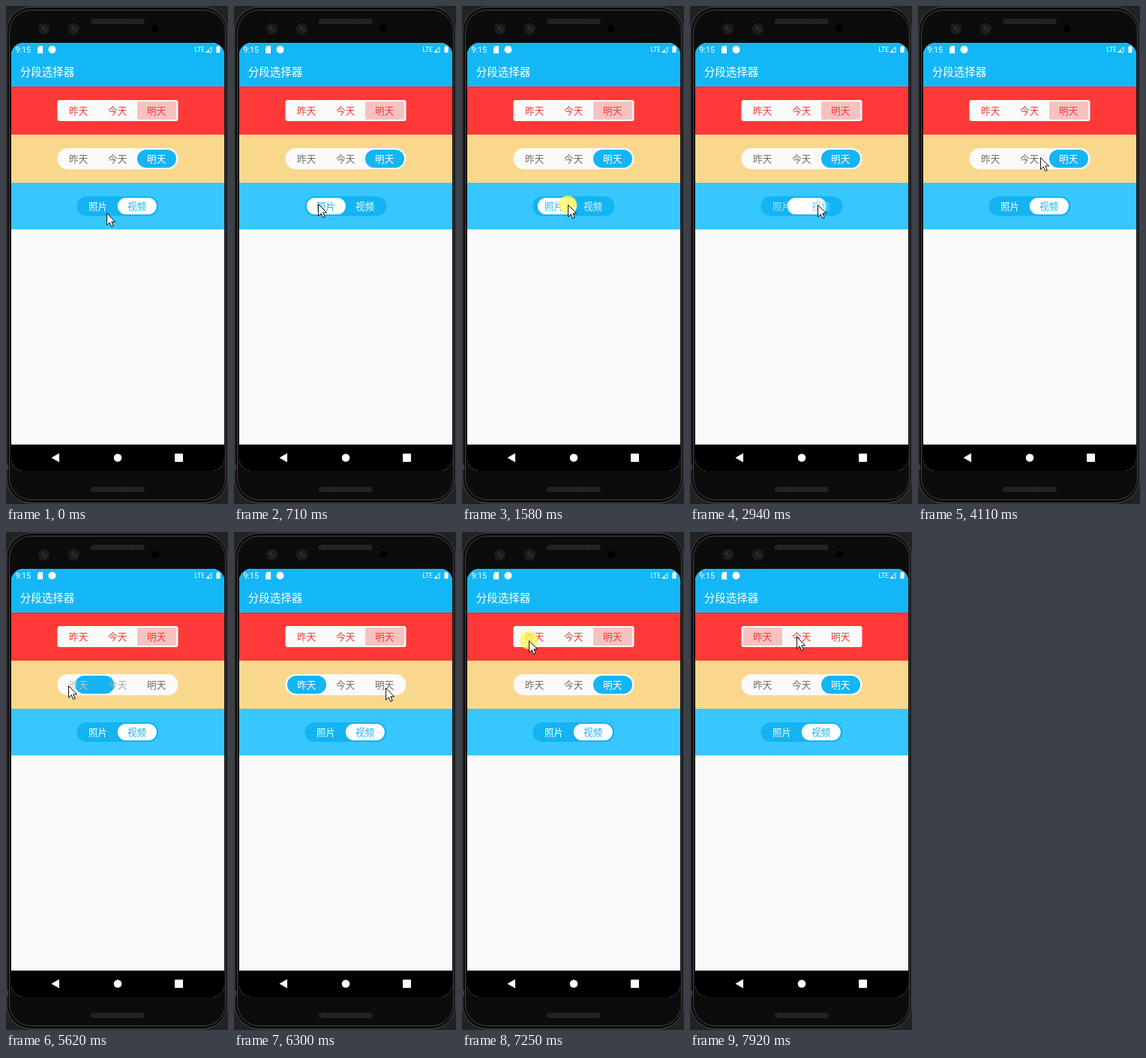
Animation of 296x662 px, one loop 8 s. Source, as an HTML page:

```html
<!DOCTYPE html>
<html lang="zh-CN">
<head>
<meta charset="utf-8">
<title>分段选择器</title>
<style>
  html, body { margin: 0; width: 100%; height: 100%; overflow: hidden; background: #1b1b1d; }
  svg { display: block; }
  text { font-family: "Noto Sans CJK SC", "Noto Sans CJK", "Noto Sans CJK JP", sans-serif; fill: #fff; }
  .status { font-family: Roboto, sans-serif; }
  .seg { font-size: 12.6px; font-weight: 350; text-anchor: middle; }
</style>
</head>
<body>
<svg width="296" height="662" viewBox="0 0 296 662">
  <defs>
    <pattern id="mesh" width="3" height="3" patternUnits="userSpaceOnUse">
      <rect width="3" height="3" fill="#292929"/>
      <circle cx="1.5" cy="1.5" r=".9" fill="#111"/>
    </pattern>
    <clipPath id="screen"><rect x="7" y="49" width="284" height="569" rx="16"/></clipPath>
    <g id="lens">
      <circle r="7.5" fill="#1d1d1f"/>
      <circle cx="-1" cy="-1.5" r="1.5" fill="#3c3c3f"/>
      <circle cx="2.5" cy="1.5" r="1.2" fill="#3c3c3f"/>
    </g>
  </defs>

  <!-- phone body -->
  <rect width="296" height="662" fill="#222224"/>
  <rect x="1" y="1.5" width="294" height="659" rx="32" fill="#0b0b0b" stroke="#4c4c4e"/>
  <rect x="4.500" y="5.500" width="288" height="651" rx="29" fill="#0c0c0c" stroke="#444446"/>
  <rect x="1" y="610" width="2" height="6" fill="#7c2630"/>
  <rect x="113" y="17" width="72" height="7" rx="3.5" fill="url(#mesh)"/>
  <rect x="113" y="639" width="72" height="7" rx="3.5" fill="url(#mesh)"/>
  <use href="#lens" x="50.5" y="30.5"/>
  <use href="#lens" x="90.5" y="30.5"/>
  <circle cx="199" cy="30" r="5" fill="#000"/>

  <!-- screen -->
  <g clip-path="url(#screen)">
    <rect x="7" y="49" width="284" height="569" fill="#fafafa"/>
    <rect x="7" y="49" width="284" height="58" fill="#14b7f6"/>
    <rect x="7" y="107" width="284" height="64" fill="#ff3838"/>
    <rect x="7" y="171" width="284" height="64" fill="#f9d88d"/>
    <rect x="7" y="235" width="284" height="62" fill="#38c6ff"/>
    <rect x="7" y="583" width="284" height="35" fill="#000"/>
  </g>
  <text class="status" x="12.5" y="62" font-size="10.6">9:15</text>
  <text class="status" x="251.5" y="61.3" font-size="8.6">LTE</text>
  <text x="18.8" y="92.5" font-size="14.5">分段选择器</text>
  <g fill="#fff">
    <path d="M44.5 53H49V63H42V55.5Z"/>
    <circle cx="61.5" cy="58" r="5"/>
    <path d="M267 61.5L274 54.500V61.500Z" fill="none" stroke="#fff" stroke-width=".9"/>
    <path d="M267 61.500L270.500 58V61.500Z"/>
    <path d="M280.500 54H282V53H284V54H285.500V62H280.500Z"/>
    <path d="M60.500 600.500L71 594.500V606.500Z"/>
    <circle cx="149" cy="600.500" r="5.300"/>
    <rect x="225" y="595" width="11" height="11" rx=".8"/>
  </g>

  <g id="controls"></g>
  <circle id="press" r="12" fill="#fff75e" fill-opacity=".8"/>
  <path id="cursor" d="M.5.5V16.200L4.200 12.800L6.700 18.400L9.200 17.300L6.800 11.800H11.600Z"
        fill="#fff" stroke="#111" stroke-linejoin="round"/>
</svg>
<script>
const LOOP = 8000, SEG = 52, HOLD = 150, DELAY = 60, SLIDE = 180;
const $ = id => document.getElementById(id);
const clamp = k => Math.min(1, Math.max(0, k));
const smooth = k => k * k * (3 - 2 * k);

function add(tag, attrs, text = '') {
  const el = document.createElementNS('http://www.w3.org/2000/svg', tag);
  for (const k in attrs) el.setAttribute(k, attrs[k]);
  el.textContent = text;
  return $('controls').appendChild(el);
}

// Segmented control: track, sliding thumb and labels that fade between two colours
function control({ y, h, r, left, back, fill, on, off, labels }) {
  const width = SEG * labels.length;
  add('rect', { x: left - 2.5, y, width: width + 5, height: h, rx: r, fill: back });
  const thumb = add('rect', { y: y + 2, width: SEG, height: h - 4, rx: Math.max(r - 2, 2), fill });
  const texts = labels.map((s, i) =>
    add('text', { class: 'seg', x: left + SEG * (i + .5) - .3, y: y + h / 2 + 4.5 }, s));
  return {
    start: labels.length - 1,
    set(pos) {
      thumb.setAttribute('x', left + SEG * pos);
      texts.forEach((el, i) => {
        const share = 100 * clamp(1 - Math.abs(pos - i));
        el.style.fill = `color-mix(in srgb, ${on} ${share}%, ${off})`;
      });
    }
  };
}

const wide = { h: 28, left: 71, back: '#fafafa', labels: ['昨天', '今天', '明天'] };
const red = control({ ...wide, y: 125, r: 3, fill: '#f6c1c1', on: '#f43a3a', off: '#f43a3a' });
const orange = control({ ...wide, y: 189, r: 14, fill: '#14b5f3', on: '#fff', off: '#6c6c6c' });
const blue = control({ y: 253, h: 26, r: 13, left: 96.8, back: '#14b3f2', fill: '#fff',
  on: '#14b3f2', off: '#fff', labels: ['照片', '视频'] });

// Cursor moves: from, to, x, y
const moves = [
  [0, 0, 134, 275], [80, 230, 112, 263], [700, 1260, 137, 264], [1410, 2790, 170, 264],
  [3030, 3270, 183, 271], [3430, 3700, 141, 240], [3700, 4110, 163, 201],
  [4700, 5160, 83, 204], [5690, 5990, 202, 207], [6600, 7070, 89, 144], [7690, 7920, 142, 139]
];

const gestures = [
  { t: 230, on: blue, to: 0 },
  { t: 1410, on: blue, to: 1, hold: 1530, drag: true },
  { t: 4220, on: orange, to: 1 },
  { t: 5310, on: orange, to: 0 },
  { t: 6150, on: orange, to: 2 },
  { t: 7250, on: red, to: 0 }
].map(g => ({ ...g, end: g.t + (g.hold || HOLD) }));

const held = t => gestures.find(g => t >= g.t && t < g.end);

function cursorAt(t) {
  const ease = held(t)?.drag ? k => k : smooth;
  let [, , x, y] = moves[0];
  for (const [from, to, mx, my] of moves.slice(1)) {
    const k = ease(clamp((t - from) / (to - from)));
    x += (mx - x) * k;
    y += (my - y) * k;
  }
  return [x, y];
}

function thumbAt(target, t) {
  let pos = target.start;
  for (const g of gestures) {
    if (g.on !== target || t < g.t) continue;
    if (g.drag) pos += (cursorAt(Math.min(t, g.end))[0] - cursorAt(g.t)[0]) / SEG;
    pos += (g.to - pos) * smooth(clamp((t - g.end - DELAY) / SLIDE));
  }
  return pos;
}

function draw() {
  const t = performance.now() % LOOP;
  for (const c of [red, orange, blue]) c.set(thumbAt(c, t));
  const place = `translate(${cursorAt(t)})`;
  $('cursor').setAttribute('transform', place);
  $('press').setAttribute('transform', place);
  $('press').setAttribute('visibility', held(t) ? 'visible' : 'hidden');
  requestAnimationFrame(draw);
}
draw();
</script>
</body>
</html>
```
